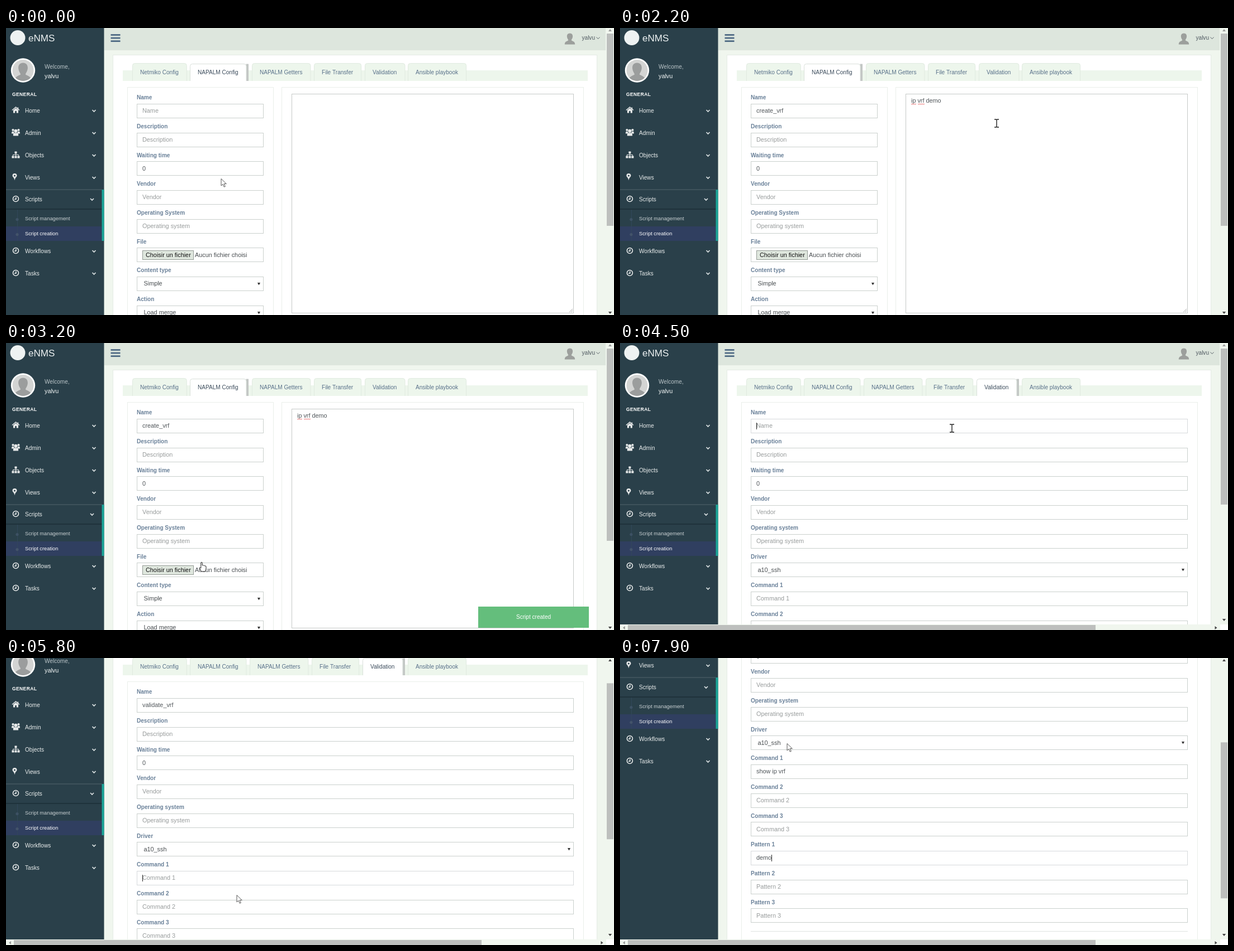
Write an HTML page with a canvas that moves like this. It is 1088 px wide and 515 px high and loops after 8 s.

```html
<!DOCTYPE html>
<html lang="en">
<head>
<meta charset="utf-8">
<title>Script creation</title>
<style>
  html, body { margin: 0; width: 100%; height: 100%; overflow: hidden; background: #f0f6ee; }
  canvas { display: block; }
</style>
</head>
<body>
<canvas id="stage" width="1088" height="515"></canvas>
<script>
const ctx = document.getElementById('stage').getContext('2d');
const LOOP = 8000, STEP = 100, ROW = 51.67, USER = 'yalvu';
const SMALL = 9.3, BASE = 10.07, FIELD = 10.85;

// ---------- drawing helpers ----------
function rect(x, y, w, h, color) {
  ctx.fillStyle = color;
  ctx.fillRect(x, y, w, h);
}
function frame(x, y, w, h, border, fill) {
  if (fill) rect(x, y, w, h, fill);
  ctx.strokeStyle = border;
  ctx.lineWidth = 1;
  ctx.strokeRect(x + .5, y + .5, w - 1, h - 1);
}
function text(str, x, y, size, color, bold = false, spacing = 0) {
  ctx.font = `${bold ? 'bold ' : ''}${size}px "Liberation Sans", Arial, sans-serif`;
  ctx.letterSpacing = spacing + 'px';
  ctx.fillStyle = color;
  ctx.fillText(str, x, y);
  return ctx.measureText(str).width;
}
function disc(x, y, r, color) {
  ctx.fillStyle = color;
  ctx.beginPath();
  ctx.arc(x, y, r, 0, 7);
  ctx.fill();
}
function shape(path, x, y, fill, stroke, width = 1) {
  ctx.save();
  ctx.translate(x, y);
  const p = new Path2D(path);
  if (fill) { ctx.fillStyle = fill; ctx.fill(p); }
  if (stroke) { ctx.strokeStyle = stroke; ctx.lineWidth = width; ctx.stroke(p); }
  ctx.restore();
}
const chevron = (x, y, color, width = 1.7) => shape('M-3-1.5L0 1.5L3-1.5', x, y, null, color, width);

function silhouette(x, y, s, color) {
  ctx.save();
  ctx.translate(x, y);
  ctx.scale(s, s);
  shape('M0-11C4-11 6-8 5.5-4C5 0 3 1 3 3C6 5 10 5 10 11H-10C-10 5-6 5-3 3C-3 1-5 0-5.5-4C-6-8-4-11 0-11Z', 0, 0, color);
  ctx.restore();
}

// ---------- timing helpers ----------
function track(keys, t) {
  const i = keys.findIndex(k => k[0] > t);
  if (i === 0) return keys[0].slice(1);
  if (i < 0) return keys[keys.length - 1].slice(1);
  const a = keys[i - 1], b = keys[i], u = (t - a[0]) / (b[0] - a[0]);
  return a.slice(1).map((v, j) => typeof v === 'number' ? v + (b[j + 1] - v) * u : v);
}
const clamp = v => Math.max(0, Math.min(1, v));
const typed = (str, from, to, t) => str.slice(0, Math.floor(str.length * clamp((t - from) / (to - from))));

// ---------- timeline ----------
const MOUSE = [
  [0, 385, 270, 'arrow'], [200, 372, 225, 'arrow'], [300, 345, 152, 'beam'], [400, 335, 151, 'beam'],
  [1000, 335, 151, 'beam'], [1150, 450, 156, 'arrow'], [1250, 560, 164, 'beam'], [1400, 674, 171, 'beam'],
  [2200, 674, 171, 'beam'], [2300, 560, 250, 'arrow'], [2600, 350, 394, 'hand'],
  [3200, 350, 394, 'hand'], [3300, 380, 350, 'arrow'], [3700, 672, 78, 'hand'], [3900, 672, 78, 'arrow'],
  [4000, 620, 125, 'arrow'], [4100, 594, 153, 'beam'], [5000, 594, 153, 'beam'],
  [5100, 560, 230, 'arrow'], [5500, 408, 459, 'beam'], [5700, 408, 459, 'beam'],
  [5800, 413, 425, 'arrow'], [6700, 413, 425, 'arrow'], [7000, 336, 358, 'beam'],
  [7500, 336, 358, 'beam'], [7600, 326, 300, 'arrow'], [7900, 299, 153, 'arrow']
];
const SCROLL = [[2300, 0], [2600, 224], [2900, 224], [3100, 0], [5700, 0], [6100, 255]];
const FOCUS = [
  [400, 1400, 'create name'], [1400, 2200, 'config'], [4100, 4300, 'check name'],
  [4500, 5500, 'check name'], [5500, 6900, 'Command 1'], [7000, LOOP, 'Pattern 1']
];

// ---------- sidebar ----------
const ICON = '#e7e9e9';
const ICONS = {
  home: (x, y) => {
    shape('M-6.5 0L0-5.5L6.5 0', x, y, null, ICON, 1.5);
    shape('M-4.5 0L0-3.8L4.5 0V5H1.3V1.5H-1.3V5H-4.5Z M3-5H4.7V-1H3Z', x, y, ICON);
  },
  users: (x, y) => {
    for (const side of [-1, 1]) {
      disc(x + side * 5, y - 4.5, 2.1, ICON);
      shape('M-2.2 2V0Q-2.2-2 0-2Q2.2-2 2.2 0V2Z', x + side * 5.2, y, ICON);
    }
    disc(x, y - 2.7, 3.1, ICON);
    shape('M-4.6 6V4Q-4.6 .8-2 .8H2Q4.6 .8 4.6 4V6Z', x, y, ICON);
  },
  tree: (x, y) => {
    shape('M-2-6H2V-2H-2Z M-7 2H-3V6H-7Z M-2 2H2V6H-2Z M3 2H7V6H3Z', x, y, ICON);
    shape('M0-2V2M-5 2V0H5V2', x, y, null, ICON);
  },
  pin: (x, y) => {
    shape('M0 6C-1 0-4 0-4-2.5A4 4 0 0 1 4-2.5C4 0 1 0 0 6Z', x - 2, y, ICON);
    disc(x - 2, y - 2.4, 1.5, '#2a404a');
  },
  clock: (x, y) => shape('M5 0A5 5 0 1 1-5 0A5 5 0 1 1 5 0M.4-3V.7H-2.5', x, y, null, ICON, 1.6)
};
const MENU = [
  ['Home', 148, 'home'], ['Admin', 188, 'users'], ['Objects', 228, 'tree'], ['Views', 268, 'pin'],
  ['Scripts', 307, 'clock'], ['Workflows', 400, 'clock'], ['Tasks', 440, 'clock']
];

function sidebar(height) {
  rect(0, 0, 175.5, height, '#2a404a');
  disc(21, 17.5, 13.5, '#eef2f2');
  text('eNMS', 40, 24, 17.05, '#ecf0f1');

  disc(30.5, 76, 21.7, '#fff');
  disc(30.5, 76, 19, '#d3d4d3');
  ctx.save();
  ctx.beginPath();
  ctx.arc(30.5, 76, 19, 0, 7);
  ctx.clip();
  silhouette(30.5, 79, 1.5, '#9b9d9d');
  ctx.restore();
  text('Welcome,', 69, 73, BASE, '#bac4c8');
  text(USER, 69, 90, FIELD, '#f4f7f7');
  text('GENERAL', 11, 121.5, 8.53, '#fff', true, .39);

  rect(0, 289.5, 171.5, 1, '#52656d');
  rect(0, 324.5, 171.5, 1, '#15252c');
  rect(0, 356, 171.5, 26, '#303f60');
  rect(171.5, 290, 4, 92, '#1ba698');
  rect(20, 326, 1, 56, '#32475a');
  disc(20, 343.5, 2.6, '#3d5163');
  disc(20, 370.5, 2.6, '#43536a');
  text('Script management', 34, 345, SMALL, '#c9d0d3');
  text('Script creation', 34, 372, SMALL, '#fff');
  for (const [name, y, icon] of MENU) {
    ICONS[icon](17.5, y - .5);
    text(name, 34, y + 4.3, BASE, '#e9ecec');
    chevron(name === 'Scripts' ? 154 : 157.5, y + .5, '#dfe5e6');
  }
}

// ---------- page ----------
const TABS = [
  ['Netmiko Config', 240], ['NAPALM Config', 343], ['NAPALM Getters', 450],
  ['File Transfer', 561], ['Validation', 652], ['Ansible playbook', 729]
];

function header() {
  rect(175.5, 0, 897.5, 40, '#dde6dd');
  for (let i = 0; i < 3; i++) rect(187.5, 11 + i * 5.6, 17, 2.8, '#4f6a84');
  silhouette(1009, 19.5, .92, '#9c9f9c');
  text(USER, 1030.5, 21, BASE, '#515b62');
  chevron(1059.5, 18, '#515b62', 1);
}

function tabs(active) {
  rect(209, 76, 832, 19, '#edf6ec');
  TABS.forEach(([name, base], i) => {
    const x = base + (i > active ? 4 : 0), on = i === active;
    const w = text(name, x, 82.5, BASE, 'transparent') + 28;
    if (on) rect(x - 14 + w, 64.5, 4.5, 30.5, '#c3c7c5');
    ctx.beginPath();
    ctx.roundRect(x - 13.5, on ? 64.5 : 63.5, w, 32, [4, 4, 0, 0]);
    ctx.fillStyle = on ? '#fff' : '#edf6ec';
    ctx.fill();
    ctx.strokeStyle = on ? '#d9e0da' : '#e0eae0';
    ctx.lineWidth = 1;
    ctx.stroke();
    rect(x - 14, 95, w + 2, 3, '#fff');
    text(name, x, 82.5, BASE, on ? '#3c4c5c' : '#587089');
  });
}

function caret(x, y) { rect(Math.round(x), y - 9, 1, 12, '#222'); }

function field({ label, value = '', hint = label, kind = 'input', key }, i, width, focus) {
  const top = Math.round(135.9 + i * ROW), base = Math.round(152.4 + i * ROW);
  const focused = focus && focus === key;
  text(label, 234, 128.3 + i * ROW, BASE, '#6a8199', true);
  frame(234, top, width, 26, focused ? '#d6d9dc' : '#cad0cd', '#fff');
  if (kind === 'select') {
    text(value, 246.5, base, FIELD, '#484d50');
    shape('M-2.6-2H2.6L0 2.6Z', 234 + width - 8.5, top + 13, '#333');
  } else if (kind === 'file') {
    frame(244, base - 12, 92, 17, '#949b95', '#dfe7de');
    text('Choisir un fichier', 250, base, FIELD, '#111');
    text('Aucun fichier choisi', 338, base, FIELD, '#484d50');
  } else {
    const w = text(value || hint, 244, base, FIELD, value ? '#50565a' : '#979b9b');
    if (focused) caret(244 + (value ? w : 0), base);
  }
}

function form(rows, width, focus) {
  const ruleY = Math.round(125 + rows.length * ROW), middle = 234 + width / 2;
  frame(217, 106, width + 35, ruleY - 46, '#eaefea', '#fff');
  rows.forEach((row, i) => field(row, i, width, focus));
  rect(234, ruleY, width, 1, '#dfe3e1');
  ctx.beginPath();
  ctx.roundRect(middle - 26, ruleY + 17, 52, 27, 2);
  ctx.fillStyle = '#26b99a';
  ctx.fill();
  text('Create', middle - 15.5, ruleY + 34.5, FIELD, '#fff');
}

function squiggle(x, end, y) {
  let path = `M${x} ${y}`;
  for (let i = 1; x + i * 1.5 <= end; i++) path += `L${x + i * 1.5} ${y + (i % 2)}`;
  shape(path, 0, 0, null, '#e04040', .8);
}

function configEditor(content, focused) {
  frame(493, 106, 541, 425, '#eaefea', '#fff');
  frame(511, 118, 505, 394, '#c6cac8', '#fff');
  shape('M0-1L-6 5M0 2L-3 5', 1014, 505, null, '#999', .8);
  const w = text(content, 521, 134, FIELD, '#50565a');
  if (content.length > 2) squiggle(521, 530, 136);
  if (content.length > 6) squiggle(533, 545, 136);
  if (focused) caret(521 + w, 134);
}

function createRows(t) {
  return [
    { label: 'Name', key: 'create name', value: typed('create_vrf', 500, 1000, t) },
    { label: 'Description' }, { label: 'Waiting time', value: '0' }, { label: 'Vendor' },
    { label: 'Operating System', hint: 'Operating system' }, { label: 'File', kind: 'file' },
    { label: 'Content type', kind: 'select', value: 'Simple' },
    { label: 'Action', kind: 'select', value: 'Load merge' },
    { label: 'Driver', kind: 'select', value: 'ios' }
  ];
}
function checkRows(t) {
  const numbered = (word, n, value) => ({ label: `${word} ${n}`, key: `${word} ${n}`, value });
  return [
    { label: 'Name', key: 'check name', value: typed('validate_vrf', 4500, 5000, t) },
    { label: 'Description' }, { label: 'Waiting time', value: '0' }, { label: 'Vendor' },
    { label: 'Operating system' }, { label: 'Driver', kind: 'select', value: 'a10_ssh' },
    numbered('Command', 1, typed('show ip vrf', 6100, 6570, t)), numbered('Command', 2), numbered('Command', 3),
    numbered('Pattern', 1, typed('demo', 7050, 7450, t)), numbered('Pattern', 2), numbered('Pattern', 3)
  ];
}

// ---------- overlays ----------
function scrollbars(scroll, height, wide) {
  const view = wide ? 505 : 515, length = view - 20;
  rect(1073, 0, 15, 515, '#f0f6ee');
  rect(1075, 10 + scroll * length / height, 12, length * view / height, '#bdbfbd');
  shape('M-3 2L0-2L3 2Z', 1081, 4, scroll ? '#444' : '#999');
  shape('M-3.2-2H3.2L0 2Z', 1081, view - (wide ? 8 : 4), '#444');
  if (!wide) return;
  rect(0, 505, 1074, 10, '#f0f6ee');
  rect(1074, 505, 14, 10, '#fff');
  rect(14, 506, 837, 9, '#bdbfbd');
  shape('M2-3V3L-2 0Z', 7, 511, '#999');
  shape('M-2-3V3L2 0Z', 1066.5, 511, '#444');
}

function toast(t) {
  ctx.globalAlpha = clamp((t - 2700) / 200) * clamp((3900 - t) / 200);
  rect(845, 473, 198, 38, '#64be7c');
  text('Script created', 913, 495, BASE, '#fff');
  ctx.globalAlpha = 1;
}

const POINTERS = {
  arrow: (x, y) => shape('M0 .5V13L3 10.3L5.2 15.2L7.3 14.3L5.1 9.6H9.3Z', x, y, '#fff', '#444', .9),
  beam: (x, y) => shape('M-4-7H-1L0-6L1-7H4M0-6V6M-4 7H-1L0 6L1 7H4', x, y, null, '#222', 1.4),
  hand: (x, y) => shape('M-1.2 0Q0-1.3 1.2 0V5Q2.5 4 3.6 5.4Q5 4.6 5.8 6Q7.6 5.4 8 7V11Q7.8 13.5 6.5 16H-.5Q-2 13-4 10Q-4.5 8-1.2 10Z', x, y, '#fff', '#222', 1)
};

function draw(t) {
  const checking = t >= 3900;
  const [scroll] = track(SCROLL, t);
  const height = checking ? 875 : 739;
  const focus = (FOCUS.find(([from, to]) => t >= from && t < to) || [])[2];

  rect(0, 0, 1088, 515, '#f0f6ee');
  ctx.save();
  ctx.translate(0, -Math.round(scroll));
  header();
  frame(191, 48, 867, height - 103, '#e5ebe5', '#fff');
  tabs(checking ? 4 : 1);
  if (checking) {
    ctx.globalAlpha = clamp((t - 3800) / 300);
    form(checkRows(t), 782, focus);
    ctx.globalAlpha = 1;
  } else {
    form(createRows(t), 227, focus);
    configEditor(typed('ip vrf demo', 1400, 1900, t), focus === 'config');
  }
  sidebar(height);
  ctx.restore();

  if (t >= 2800 && t < 3900) toast(t);
  scrollbars(scroll, height, checking);
  const [x, y, pointer] = track(MOUSE, t);
  POINTERS[pointer](x, y);
}

function tick() {
  draw(Math.floor(performance.now() % LOOP / STEP) * STEP);
  requestAnimationFrame(tick);
}
tick();
</script>
</body>
</html>
```
